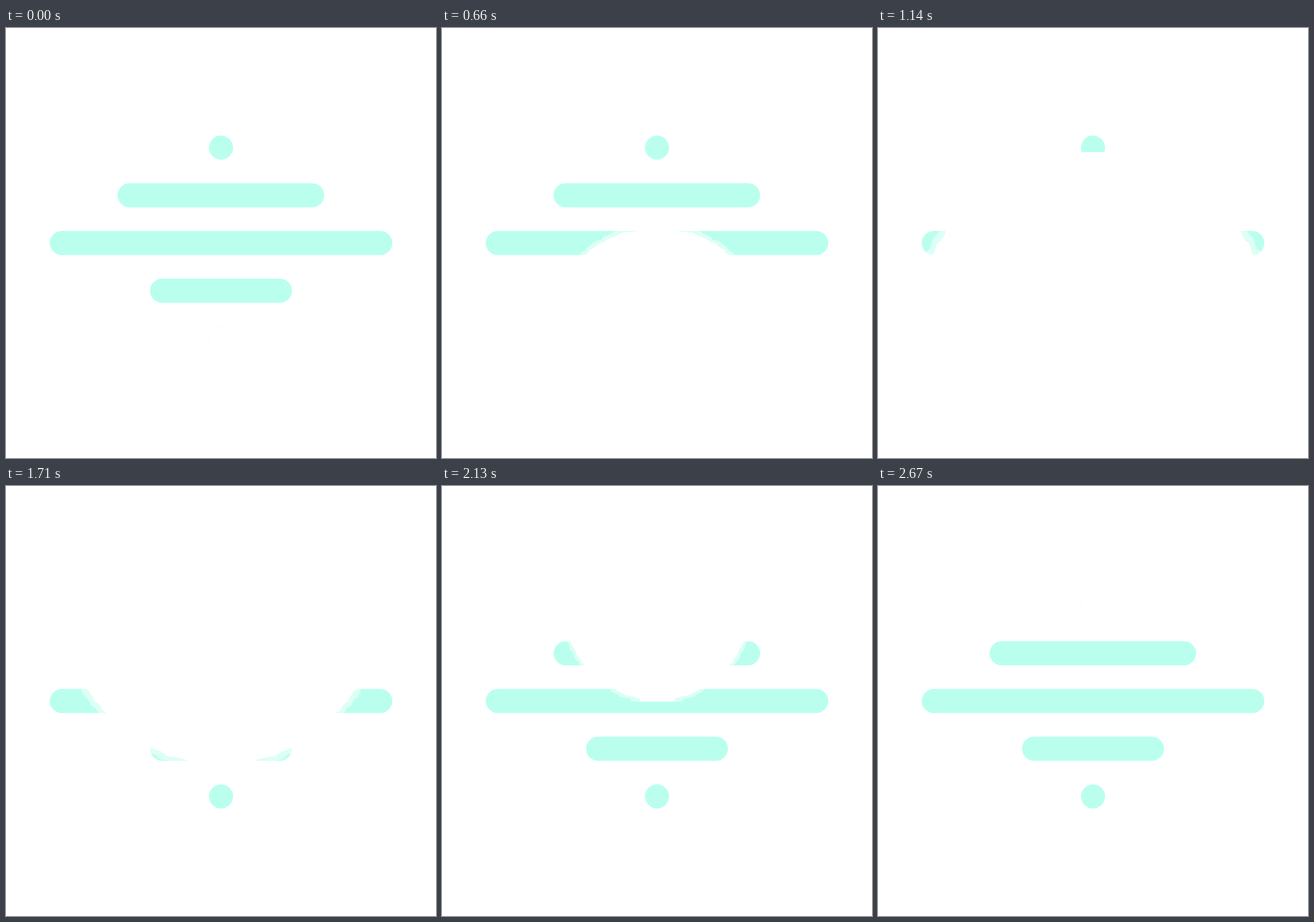
Write an HTML page with a canvas that moves like this. It is 748 by 748 pixels and loops after 2700 ms.

```html
<!DOCTYPE html>
<html lang="en">
<head>
<meta charset="utf-8">
<title>Bars</title>
<style>
  html, body { margin: 0; width: 100%; height: 100%; overflow: hidden; background: #fff; }
  svg, canvas { position: absolute; left: 0; top: 0; width: 748px; height: 748px; }
  canvas { filter: url(#steps); }
</style>
</head>
<body>
<svg viewBox="0 0 748 748" fill="#baffee">
  <filter id="steps" x="0" y="0" width="1" height="1" color-interpolation-filters="sRGB">
    <feComponentTransfer><feFuncA type="discrete" tableValues="0 .5 .5 1"/></feComponentTransfer>
  </filter>
  <rect x="353" y="187" width="42" height="42" rx="21"/>
  <rect x="194" y="270" width="359.5" height="42" rx="21"/>
  <rect x="76" y="353" width="596" height="42" rx="21"/>
  <rect x="250.5" y="436" width="247" height="42" rx="21"/>
  <rect x="353" y="519" width="42" height="42" rx="21"/>
</svg>
<canvas width="748" height="748"></canvas>
<script>
const LOOP = 2700, STEP = 30, DOT = 21;
const ctx = document.querySelector('canvas').getContext('2d');

// Small white disc; enlarging it gives the cover its soft, stepped rim.
const disc = document.createElement('canvas');
disc.width = disc.height = DOT * 2;
const pen = disc.getContext('2d');
pen.fillStyle = '#fff';
pen.arc(DOT, DOT, DOT, 0, Math.PI * 2);
pen.fill();

function cover(y, r) {
  ctx.clearRect(0, 0, 748, 748);
  ctx.drawImage(disc, 374 - r, y - r, r * 2, r * 2);
}

function draw(now) {
  const t = Math.floor(now % LOOP / STEP) * STEP;
  if (t < LOOP / 2) cover(540, DOT + 0.2658 * t);
  else cover(208, DOT + 0.2699 * (LOOP - STEP - t));
}

const start = performance.now();
function tick() {
  draw(performance.now() - start);
  requestAnimationFrame(tick);
}
tick();
</script>
</body>
</html>
```
